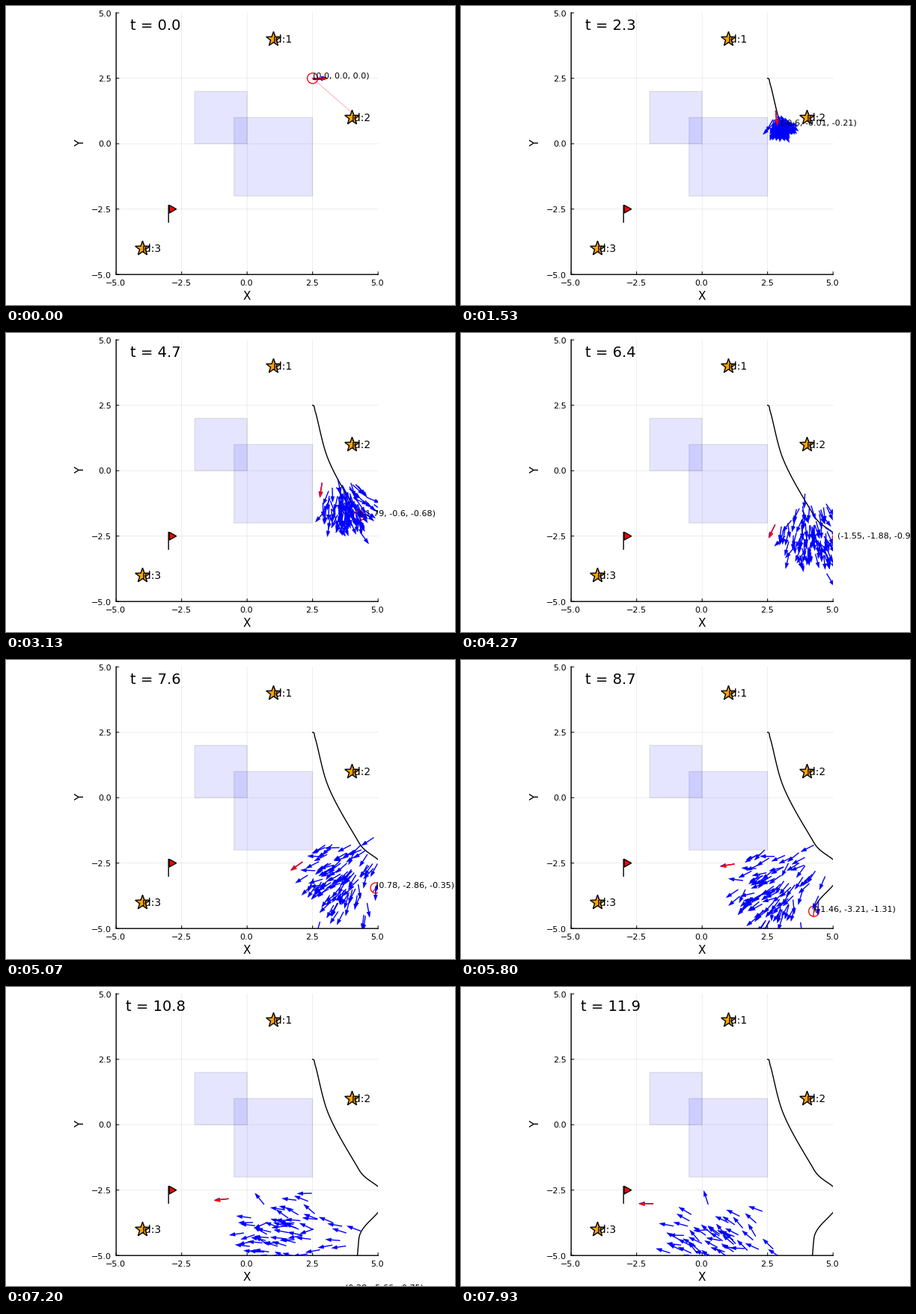
A matplotlib script for the animation above (8 s loop, 600x400 px).

```python
import matplotlib.pyplot as plt
import numpy as np
from matplotlib.animation import FuncAnimation
from matplotlib.collections import LineCollection, PolyCollection
from matplotlib.patches import Circle, Polygon, Rectangle

W, H, DPI = 600, 400, 100
TICK, LOOP_MS = 40, 8000          # screen refresh and loop in ms
STEPS, DT = 120, 0.1              # simulated steps and their length in s
SCALE, CX, CY = 35.0, 322.2, 184.2
LEFT, RIGHT, TOP, BOTTOM = CX - 175, CX + 175, CY - 175, CY + 175
ARROW, HEAD, HALF = 19.5, 7.5, 2.5
N = 100
FOV, REACH = np.pi / 3, 6.0
LANDMARKS = [(1, 4), (4, 1), (-4, -4)]
TIMES = np.arange(STEPS) * DT

# way points: time, x, y, heading
ROBOT = [
    (0, 2.5, 2.5, 0), (0.7, 2.6, 2.27, -1.25), (2.3, 3, 0.7, -1.257),
    (4.7, 4.27, -1.72, -1.052), (6.4, 5.17, -2.57, -1.091),
    (7.45, 5, -3.35, -2.25), (8.7, 4.27, -4.34, -1.681),
    (10.8, 3.75, -6.33, -2.286), (11.9, 2.91, -7.2, -2.5),
]
GUESS = [
    (0, 2.5, 2.5, 0), (0.7, 2.58, 2.31, -1.3), (2.3, 2.805, 1.268, -1.467),
    (4.7, 2.861, -0.463, -1.732), (6.4, 2.787, -2.063, -2.031),
    (8.7, 1.24, -2.536, -2.991), (10.8, -0.706, -2.83, -3.036),
    (11.9, -1.86, -3.02, -3.15),
]

plt.rcParams["font.family"] = "DejaVu Sans"


def px(x, y):
    return CX + SCALE * x, CY - SCALE * y


def lw(pixels):
    return pixels * 72 / DPI


def travel(points):
    """Poses at all steps on a Hermite curve that leaves along each heading."""
    t, x, y, a = np.array(points, float).T
    speed = np.hypot(np.gradient(x, t), np.gradient(y, t))
    i = np.clip(np.searchsorted(t, TIMES, "right") - 1, 0, len(t) - 2)
    h = t[i + 1] - t[i]
    u = (TIMES - t[i]) / h

    def hermite(p, m):
        return ((1 + 2 * u) * (1 - u)**2 * p[i] + u**2 * (3 - 2 * u) * p[i + 1]
                + h * u * (1 - u) * ((1 - u) * m[i] - u * m[i + 1]))

    return np.column_stack([hermite(x, speed * np.cos(a)),
                            hermite(y, speed * np.sin(a)),
                            np.interp(TIMES, t, a)])


def turn(x, y, a):
    c, s = np.cos(a), np.sin(a)
    return c * x - s * y, s * x + c * y


robot, guess = travel(ROBOT), travel(GUESS)
noise = np.random.default_rng(12).standard_normal((2, 3, N)).clip(-2.3, 2.3)


def particles(n):
    """A cloud between guess and robot; those to port have turned less."""
    t = TIMES[n]
    mix = 0.5 + 0.5 * np.exp(-t / 4)
    x, y, a = guess[n] + mix * (robot[n] - guess[n])
    a -= 0.17 * max(0, t - 8)
    ahead, port, wobble = noise[0] * np.cos(t / 10) + noise[1] * np.sin(t / 10)
    spread = 0.09 * t * min(1, t / 4)
    dx, dy = turn(spread * ahead, spread * port, a)
    angle = a + 0.37 * min(1, t / 2) * (0.75 * port + 0.65 * wobble)
    return x + dx, y + dy, angle


def arrows(x, y, angle):
    tail = np.column_stack(px(x, y))
    d = np.column_stack([np.cos(angle), -np.sin(angle)])
    side = d[:, ::-1] * [-1, 1]
    tip = tail + ARROW * d
    neck = tip - HEAD * d
    shafts = np.stack([tail, neck + 2 * d], axis=1)
    heads = np.stack([tip, neck + HALF * side, neck - HALF * side], axis=1)
    return shafts, heads


fig = plt.figure(figsize=(W / DPI, H / DPI), dpi=DPI, facecolor="white")
ax = fig.add_axes([0, 0, 1, 1])
ax.set_xlim(0, W)
ax.set_ylim(H, 0)
ax.axis("off")
frame = Rectangle((LEFT, TOP), RIGHT - LEFT, BOTTOM - TOP,
                  fc="none", ec="none")
ax.add_patch(frame)


def label(x, y, text, size, ha="left", va="baseline", **kw):
    return ax.text(x, y, text, fontsize=size, ha=ha, va=va, color="black", **kw)


def line(xs, ys, color="black", width=1.3, z=2, **kw):
    return ax.plot(xs, ys, color=color, lw=lw(width), zorder=z, snap=False,
                   **kw)[0]


def draw_axes():
    for v in np.linspace(-5, 5, 5):
        x, y = px(v, v)
        if abs(v) < 5:
            for xs, ys in [([x, x], [TOP, BOTTOM]), ([LEFT, RIGHT], [y, y])]:
                line(xs, ys, (0, 0, 0, 0.1), 0.7, 0.5)
        line([x, x], [BOTTOM, BOTTOM - 3.5], width=1)
        line([LEFT, LEFT + 3.5], [y, y], width=1)
        text = f"{v:.1f}".replace("-", "\u2212")
        label(x - 0.7, 374.3, text, 8, "center")
        label(141, y + 4.3, text, 8, "right")
    line([LEFT, LEFT, RIGHT], [TOP, BOTTOM, BOTTOM], width=1.4,
         solid_capstyle="projecting")
    label(322, 393.3, "X", 11, "center")
    label(99.5, 183.5, "Y", 11, "center", "center", rotation=90)


def draw_world():
    for x, y, size in [(-2, 2, 2), (-0.5, 1, 3)]:
        ax.add_patch(Rectangle(px(x, y), size * SCALE, size * SCALE,
                               fc=(0, 0, 1, 0.1), ec=(0, 0, 0, 0.1),
                               lw=lw(1.2), zorder=1, snap=False))
    spin = np.arange(10) * np.pi / 5
    radius = np.where(np.arange(10) % 2, 4.1, 10.3)
    for i, (x, y) in enumerate(LANDMARKS, 1):
        u, v = px(x, y)
        star = np.column_stack([u + 0.3 + radius * np.sin(spin),
                                v + 0.3 - radius * np.cos(spin)])
        ax.add_patch(Polygon(star, fc="orange", ec="black", lw=lw(1.4),
                             joinstyle="miter", zorder=4))
        label(u - 0.7, v + 4.5, f"id:{i}", 10, zorder=5)
    u, v = px(-3, -2.5)
    line([u, u], [v - 5, v + 17.5], width=1.4, z=4)
    flag = [(u + 1, v - 5.3), (u + 10.5, v), (u + 1, v + 5.3)]
    ax.add_patch(Polygon(flag, fc="red", ec="black", lw=lw(1.3),
                         joinstyle="miter", zorder=4))


def arrow_layer(color, z):
    shafts = LineCollection([], colors=color, linewidths=lw(1.4), zorder=z)
    heads = PolyCollection([], facecolors=color, edgecolors=color,
                           linewidths=lw(0.4), zorder=z)
    for part in (shafts, heads):
        ax.add_collection(part, autolim=False)
        part.set_clip_path(frame)
    return shafts, heads


def show_arrows(layer, x, y, angle):
    shafts, heads = arrows(x, y, angle)
    layer[0].set_segments(shafts)
    layer[1].set_verts(heads)


draw_axes()
draw_world()
sight = line([], [], "pink", 1.3, 3)
path = line([], [], "black", 1.4, 6)
body = Circle((0, 0), 7, fc="none", ec="red", lw=lw(1.3), zorder=6)
ax.add_patch(body)
nose = line([], [], "red", 1.3, 6)
for item in (sight, path, body, nose):
    item.set_clip_path(frame)
blue = arrow_layer("blue", 7)
red = arrow_layer("red", 8)
clock = label(199.5, 32.3, "", 14, "center")
pose_text = label(0, 0, "", 8, zorder=9)


def look(x, y, a):
    """Slightly wrong line of sight to each landmark in view."""
    rays = []
    for lx, ly in LANDMARKS:
        dist = np.hypot(lx - x, ly - y)
        toward = np.arctan2(ly - y, lx - x)
        off = (toward - a + np.pi) % (2 * np.pi) - np.pi
        if dist < REACH and abs(off) < FOV:
            dx, dy = turn(0.92 * dist, 0, toward + 0.065)
            rays += [px(x, y), px(x + dx, y + dy), (np.nan, np.nan)]
    return np.array(rays).reshape(-1, 2).T


def draw(k):
    n = int((k * TICK + 35) * STEPS / LOOP_MS)
    x, y, a = robot[n]
    u, v = px(x, y)

    path.set_data(*px(robot[:n + 1, 0], robot[:n + 1, 1]))
    body.center = (u, v)
    nose.set_data([u, u + 7 * np.cos(a)], [v, v - 7 * np.sin(a)])
    sight.set_data(*look(x, y, a))

    # the best particle is drawn twice, red over blue
    best = guess[n]
    show_arrows(blue, *np.column_stack([particles(n), best]))
    show_arrows(red, *best[:, None])

    dx, dy, da = best - robot[n]
    error = [round(float(e), 2) + 0.0 for e in (*turn(dx, dy, -a), da)]
    pose_text.set_position((u, v))
    pose_text.set_text("({}, {}, {})".format(*error))
    clock.set_text(f"t = {TIMES[n]:.1f}")
    return path, body, nose, sight, *blue, *red, pose_text, clock


anim = FuncAnimation(fig, draw, frames=LOOP_MS // TICK, interval=TICK,
                     init_func=lambda: draw(0), repeat=True, blit=False)
plt.show()
```
